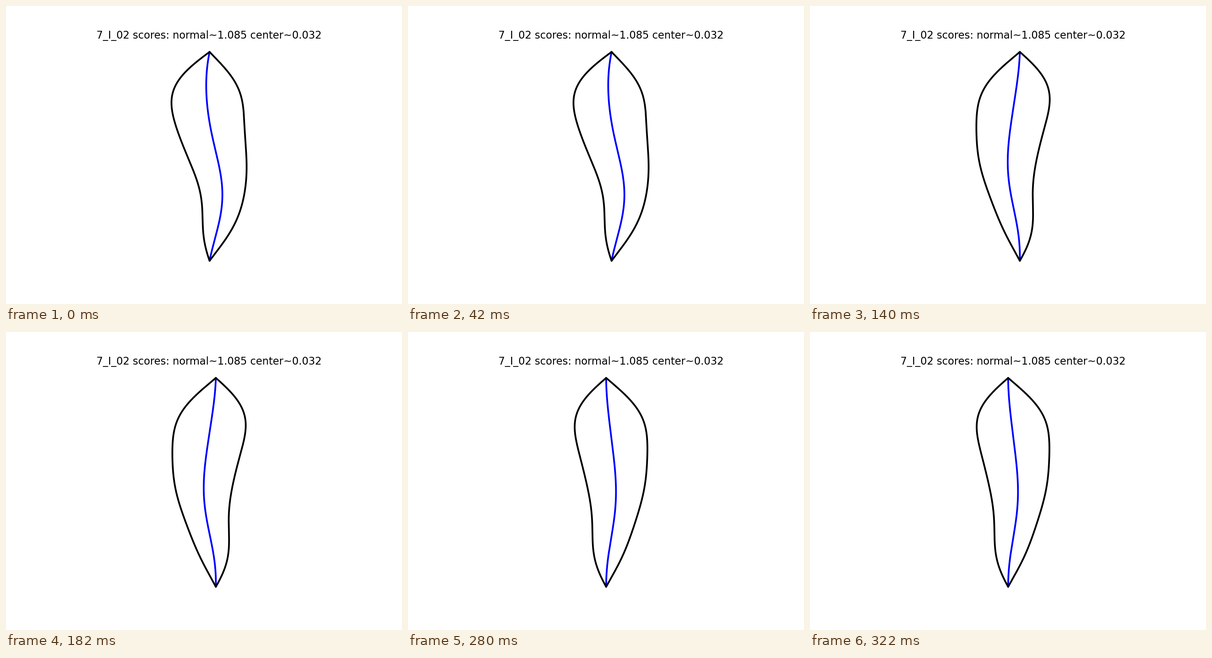
These frames come from a looping animation (863x649 px, 350 ms). A matplotlib script:

```python
import numpy as np
import matplotlib.pyplot as plt
from matplotlib.animation import FuncAnimation

W, H, DPI = 863, 649, 64
PX = 72 / DPI  # points per pixel
TOP, BOTTOM, CENTER = 100, 555, 442.5

# Sine series of the half width, from tip to tip
WIDTH_TERMS = [74.4, 17.8, 12.5, 2.2, 2.3]

# Midrib wave in each pose: sway in pixels, phase in degrees
POSES = [(17.6, 243), (25.9, 292), (13.1, 361), (15.9, 475), (10.6, 548)]

t = np.linspace(0, 1, 300)
y = TOP + (BOTTOM - TOP) * t
half = sum(a * np.sin(k * np.pi * t) for k, a in enumerate(WIDTH_TERMS, 1))


def leaf(sway, phase):
    """Midrib and both edges, with the whole leaf centred on the stage."""
    angle = 2 * np.pi * t
    swell = 1 - 0.15 * np.sin(angle)  # the lower half sways wider
    rib = sway * swell * np.cos(angle - np.radians(phase))
    left, right = rib - half, rib + half
    shift = CENTER - (left.min() + right.max()) / 2
    return rib + shift, left + shift, right + shift


fig = plt.figure(figsize=(W / DPI, H / DPI), dpi=DPI, facecolor="white")
ax = fig.add_axes([0, 0, 1, 1])
ax.set_xlim(0, W)
ax.set_ylim(H, 0)
ax.axis("off")

ax.text(442, 71.5, "7_I_02 scores: normal~1.085 center~0.032",
        family="DejaVu Sans", size=22.5 * PX, ha="center", va="baseline")

style = dict(lw=3.8 * PX, solid_capstyle="round", solid_joinstyle="round")
rib_line, = ax.plot([], [], color="#0000ff", **style)
outline, = ax.plot([], [], color="black", **style)


def draw(i):
    rib, left, right = leaf(*POSES[i])
    rib_line.set_data(rib, y)
    outline.set_data(np.r_[left, right[::-1]], np.r_[y, y[::-1]])
    return rib_line, outline


anim = FuncAnimation(fig, draw, frames=len(POSES), interval=70,
                     repeat=True, repeat_delay=0)
plt.show()
```
